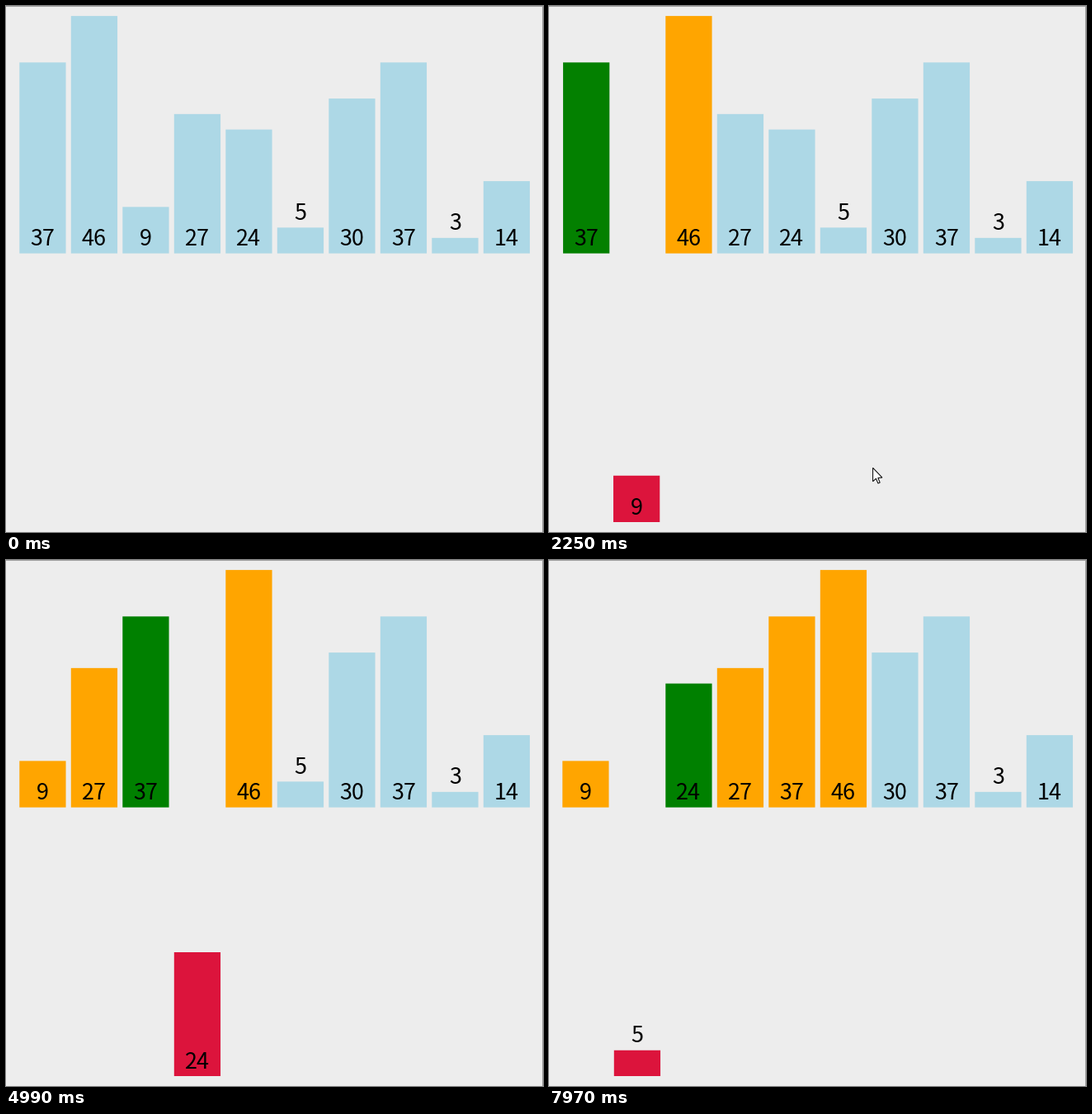
These frames come from a looping animation (651x637 px, 7990 ms). A matplotlib script:

```python
import numpy as np
import matplotlib.pyplot as plt
from matplotlib.animation import FuncAnimation
from matplotlib.colors import to_rgb
from matplotlib.patches import Polygon, Rectangle

W, H, DPI = 651, 637, 64
LOOP, STEP = 7990, 17
VALUES = [37, 46, 9, 27, 24, 5, 30, 37, 3, 14]
LEFT, PITCH, BAR_W, UNIT = 16.3, 62.5, 56.25, 6.25
BASE, DROP = 299.6, 325.4
FADE = 340


def ease(t, start, dur):
    """Cubic in-out progress."""
    p = np.clip((t - start) / dur, 0, 1)
    return 4 * p**3 if p < 0.5 else 1 - 4 * (1 - p)**3


class Track:
    """A value driven by overlapping transitions that add up."""

    def __init__(self, value):
        self.first = self.last = np.array(value, float)
        self.moves = []

    def to(self, value, start, dur):
        value = np.array(value, float)
        self.moves.append((start, dur, value - self.last))
        self.last = value

    def at(self, t):
        return self.first + sum(d * ease(t, s, dur) for s, dur, d in self.moves)


class Bar:
    def __init__(self, ax, slot, value):
        self.h = value * UNIT
        self.slot, self.depth = Track(slot), Track(0)
        self.color = Track(to_rgb("lightblue"))
        self.rect = ax.add_patch(Rectangle((0, 0), BAR_W, self.h, lw=0, snap=False))
        self.label = ax.text(0, 0, str(value), ha="center", va="baseline",
                             family="Noto Sans CJK JP", fontsize=27 * 72 / DPI)
        self.pad = 9.5 if self.h > 40 else self.h + 9.5

    def paint(self, name, start, dur=FADE):
        self.color.to(to_rgb(name), start, dur)

    def draw(self, t):
        x = LEFT + PITCH * self.slot.at(t)
        y = BASE + DROP * self.depth.at(t)
        self.rect.set_xy((x, y - self.h))
        self.rect.set_facecolor(np.clip(self.color.at(t), 0, 1))
        self.label.set_position((x + BAR_W / 2, y - self.pad))


fig = plt.figure(figsize=(W / DPI, H / DPI), dpi=DPI, facecolor="#ededed")
ax = fig.add_axes([0, 0, 1, 1])
ax.set(xlim=(0, W), ylim=(H, 0))
ax.axis("off")
ax.add_patch(Rectangle((0, 0), W, 1, color="#a0a0a0", lw=0))
ax.add_patch(Rectangle((W - 1, 0), 1, H, color="#a0a0a0", lw=0))

bars = [Bar(ax, i, v) for i, v in enumerate(VALUES)]
b37, b46, b9, b27, b24, b5 = bars[:6]


def extract(key, start, compare=None):
    key.depth.to(1, start, FADE)
    key.paint("crimson", start)
    if compare:
        compare.paint("green", start)


def swap(key, other, start, compare=None, dur=FADE, lag=0):
    other.slot.to(other.slot.last + 1, start, dur)
    key.slot.to(key.slot.last - 1, start, dur)
    other.paint("orange", start + lag, dur)
    if compare:
        compare.paint("green", start + lag, dur)


def insert(key, start, compare=None):
    key.depth.to(0, start, FADE)
    key.paint("orange", start)
    if compare:
        compare.paint("orange", start)


b37.paint("orange", 480, 170)

extract(b46, 840, b37)
insert(b46, 1140, b37)

extract(b9, 1450)
swap(b9, b46, 1800, b37)
swap(b9, b37, 2203)
insert(b9, 2385)

extract(b27, 2700, b46)
swap(b27, b46, 3215, b37, 330)
swap(b27, b37, 3683, b9, 400, lag=25)
insert(b27, 3865, b9)

extract(b24, 4190, b46)
swap(b24, b46, 4675, b37, 310)
swap(b24, b37, 5135, b27, 310)
swap(b24, b27, 5595, b9, 360)
insert(b24, 5774, b9)

extract(b5, 6085, b46)
swap(b5, b46, 6585, b37, 310)
swap(b5, b37, 7085, b27, 300)
swap(b5, b27, 7525, b24, 320)
b24.slot.to(2, 7740, 215)
b5.slot.to(1, 7740, 215)

ARROW = np.array([(0, 0), (0, 16.5), (3.8, 13), (6.3, 18.8), (8.6, 17.8),
                  (6.2, 12.2), (11.3, 11.8)]) + 0.5
POINTER = np.array([(1250, -12, 604), (1640, 286, 598), (1800, 313, 593),
                    (2250, 392, 559), (2400, 399, 546)])
pointer = ax.add_patch(Polygon(ARROW, fc="white", ec="black",
                               lw=72 / DPI, joinstyle="miter", zorder=9))


def update(i):
    t = (i + 0.5) * STEP
    for bar in bars:
        bar.draw(t)
    times, xs, ys = POINTER.T
    pointer.set_visible(1250 <= t < 2490)
    pointer.set_xy(ARROW + [np.interp(t, times, xs), np.interp(t, times, ys)])
    return []


anim = FuncAnimation(fig, update, frames=LOOP // STEP, interval=STEP,
                     init_func=lambda: update(0), repeat=True,
                     repeat_delay=0, blit=False)
plt.show()
```
